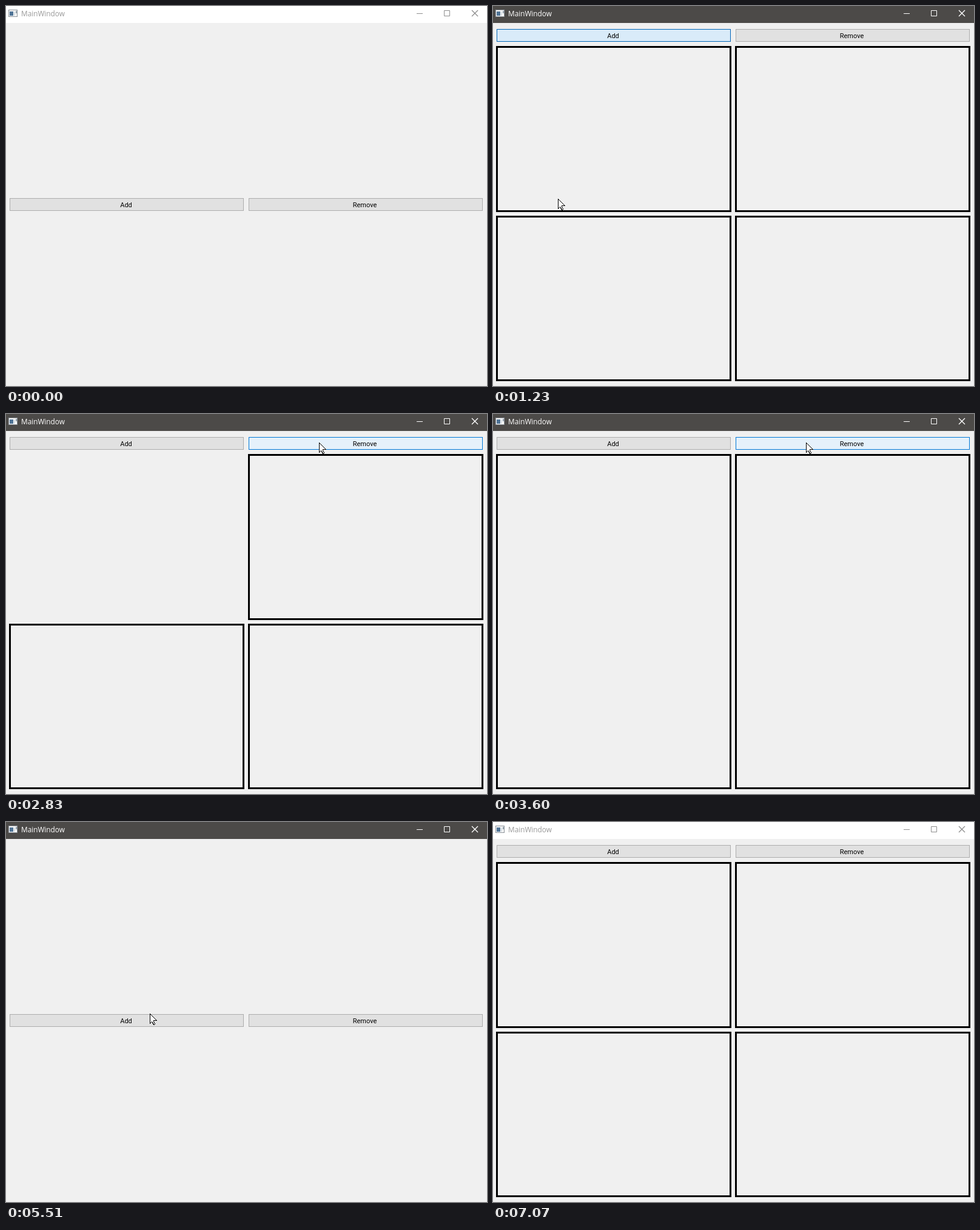
These frames come from a looping animation (793x627 px, 7530 ms). An HTML page:

```html
<!DOCTYPE html>
<html lang="en">
<head>
<meta charset="utf-8">
<title>MainWindow</title>
<style>
  html, body { margin: 0; width: 100%; height: 100%; overflow: hidden; background: #f0f0f0; }
  svg { display: block; width: 100vw; height: 100vh; }
  .label { font: 11px Roboto, sans-serif; text-anchor: middle; fill: #000; }
  .caption { font: 11.8px "Open Sans", sans-serif; }
  .panel { fill: none; stroke: #000; stroke-width: 3; }
</style>
</head>
<body>
<svg viewBox="0 0 793 627">
  <rect width="793" height="627" fill="#f0f0f0"/>
  <rect id="bar" width="793" height="28"/>
  <rect x="4.5" y="6.5" width="14" height="11" fill="#f7f7f7" stroke="#8c9299"/>
  <rect x="6" y="9" width="6" height="7" fill="#4f7396"/>
  <rect x="13" y="9" width="2" height="7" fill="#d5dde4"/>
  <rect x="16" y="8" width="2" height="4" fill="#9aa7b2"/>
  <text id="caption" class="caption" x="25" y="17">MainWindow</text>
  <g id="controls" fill="none">
    <path d="M677 12.5h10M722.5 7.5h9v9h-9z"/>
    <path d="M768 7l10 10M778 7l-10 10" stroke-width="1.4"/>
  </g>
  <g id="buttons">
    <rect id="add" x="6.5" y=".5" width="385" height="20"/>
    <text class="label" x="198" y="15">Add</text>
    <rect id="remove" x="400.5" y=".5" width="385" height="20"/>
    <text class="label" x="591.5" y="15">Remove</text>
  </g>
  <rect class="panel" x="6.5" width="385"/>
  <rect class="panel" x="400.5" width="385"/>
  <rect class="panel" x="6.5" width="385"/>
  <rect class="panel" x="400.5" width="385"/>
  <path id="cursor" d="M.5.5V16.5L3.5 13.5 4.5 14.5 6.5 18.5H7.5L8.5 17.5 6.5 12.5 7 11.5H11.5Z"
    fill="#fff" stroke="#000" shape-rendering="crispEdges"/>
</svg>
<script>
const LOOP = 7530, DELAY = 202, STEP = 1000 / 13;
const $ = id => document.getElementById(id);
const panels = [...document.querySelectorAll('.panel')];

// All times below are steps, 13 to the second.
const entry = { x: 645, y: 630 };
const moves = [
  { from: -1, to: 9, x: 107, y: 318 },
  { from: 15, to: 20, x: 113, y: 371 },
  { from: 20, to: 30, x: 516, y: 47 },
  { from: 58, to: 64, x: 237, y: 316 },
  { from: 75, to: 81, x: 449, y: 655 }
];
const buttons = {
  add: { hovers: [[6, 14], [69, 75]], clicks: [11, 72] },
  remove: { hovers: [[27, 59]], clicks: [31, 40, 46, 54] }
};
const FADE = 2, RELEASE = 2;

// Colours for idle, hovered and pressed
const fills = [[225, 225, 225], [229, 241, 251], [204, 228, 247]];
const edges = [[173, 173, 173], [0, 120, 215], [0, 84, 153]];

const clamp = u => Math.max(0, Math.min(1, u));
const ease = u => u * u * (3 - 2 * u);
const mix = (a, b, u) => a + (b - a) * u;

function cursorAt(k) {
  return moves.reduce((p, m) => {
    const u = ease(clamp((k - m.from) / (m.to - m.from)));
    return { x: mix(p.x, m.x, u), y: mix(p.y, m.y, u) };
  }, entry);
}

function buttonLevel({ hovers, clicks }, k) {
  let level = 0;
  for (const [enter, leave] of hovers)
    level += clamp((k - enter) / FADE) - clamp((k - leave) / FADE);
  for (const press of clicks)
    if (k >= press) level += 1 - clamp((k - press - 1) / FADE);
  return level;
}

function shade(colors, level) {
  const i = Math.min(1, Math.floor(level));
  return `rgb(${colors[i].map((v, c) => Math.round(mix(v, colors[i + 1][c], level - i)))})`;
}

// Add fills the grid with four panels, Remove takes one away.
function panelCount(k) {
  const done = id => buttons[id].clicks.filter(press => k >= press + RELEASE).length;
  return 4 * done('add') - done('remove');
}

function draw(t) {
  const k = Math.floor((t - DELAY) / STEP);
  const active = k >= buttons.add.clicks[0] && t < 7070;
  $('bar').setAttribute('fill', active ? '#4c4a48' : '#fff');
  $('caption').setAttribute('fill', active ? '#fff' : '#999');
  $('controls').setAttribute('stroke', active ? '#fff' : '#8f8f8f');

  const count = panelCount(k);
  $('buttons').setAttribute('transform', `translate(0 ${count ? 38 : 317})`);
  for (const id in buttons) {
    const level = buttonLevel(buttons[id], k);
    $(id).setAttribute('fill', shade(fills, level));
    $(id).setAttribute('stroke', shade(edges, level));
  }

  // Once the top row is empty the bottom row takes the whole height.
  panels.forEach((panel, i) => {
    const top = i > 1 && count > 2 ? 347.5 : 67.5;
    const bottom = i > 1 ? 617.5 : 338.5;
    panel.setAttribute('visibility', i >= 4 - count ? 'visible' : 'hidden');
    panel.setAttribute('y', top);
    panel.setAttribute('height', bottom - top);
  });

  const { x, y } = cursorAt(k);
  $('cursor').setAttribute('transform', `translate(${Math.round(x)} ${Math.round(y)})`);
}

const start = performance.now();
function tick() {
  draw((performance.now() - start) % LOOP);
  requestAnimationFrame(tick);
}
tick();
</script>
</body>
</html>
```
